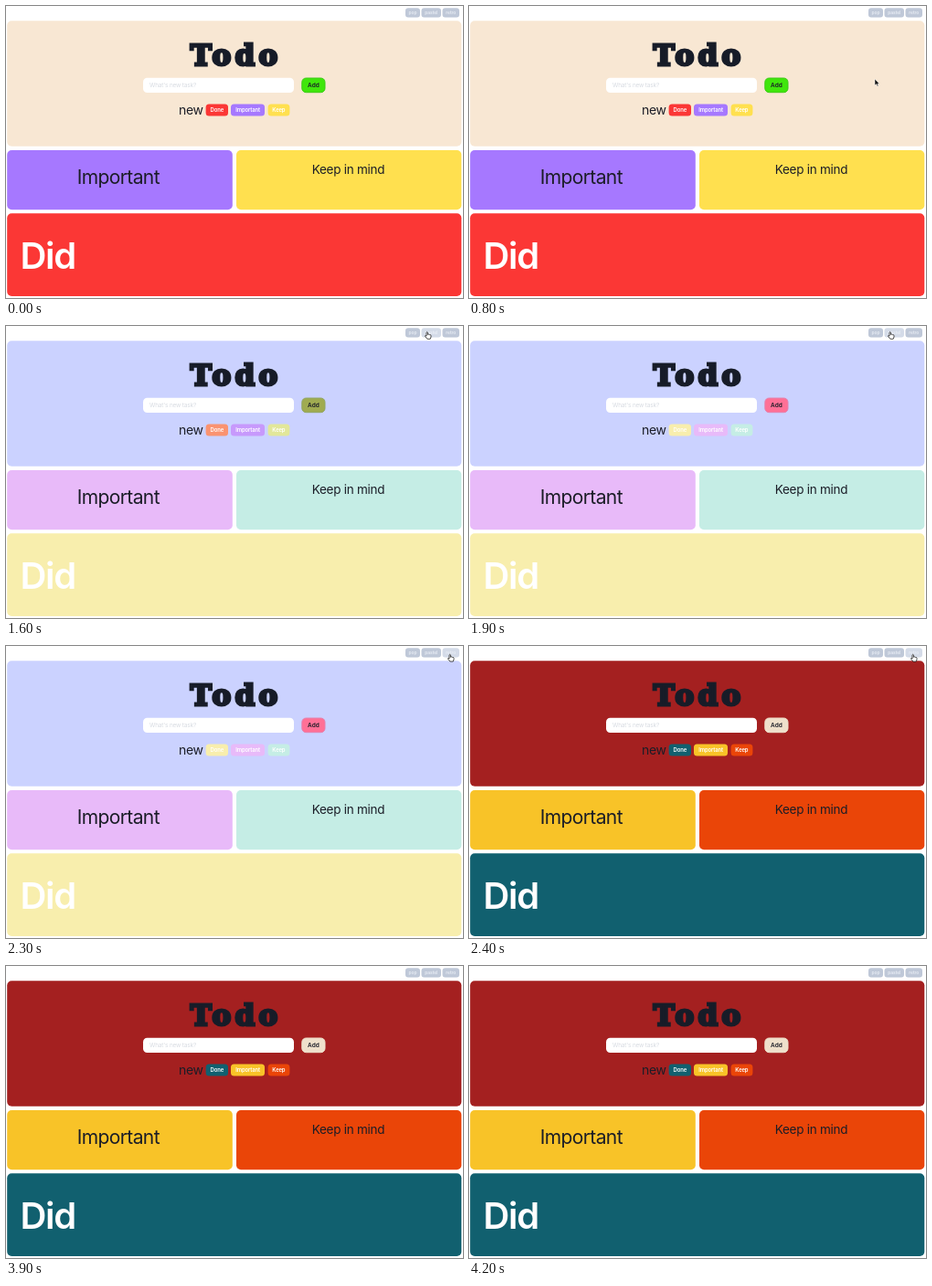
Animation of 500x320 px, one loop 4.3 s. Source, as an HTML page:

```html
<!DOCTYPE html>
<html lang="en">
<head>
<meta charset="utf-8">
<title>Todo</title>
<style>
  html, body { margin: 0; width: 100%; height: 100%; overflow: hidden; background: #fff; }
  svg { display: block; width: 500px; height: 320px; }
  text { font-family: Inter, Roboto, sans-serif; fill: #1b1d27; letter-spacing: -.02em; }
  .title { font: 700 31px "DejaVu Serif", serif; letter-spacing: 4.3px; text-anchor: middle;
    fill: #171c28; stroke: #171c28; stroke-width: 3px; }
  .important-head { font-size: 21px; letter-spacing: -.03em; }
  .keep-head { font-size: 13.5px; }
  .did-head { font-size: 40px; font-weight: 600; letter-spacing: -.03em; fill: #fff; }
  .new { font-size: 14px; }
  .hint { font-size: 6.4px; fill: #d6dae1; }
  .chip { font-size: 5.9px; font-weight: 600; fill: #fff; text-anchor: middle; }
  .add { font-size: 6.5px; font-weight: 600; text-anchor: middle; letter-spacing: 0; }
  .tab { font-size: 5px; font-weight: 500; fill: #edf1f8; text-anchor: middle; }
</style>
</head>
<body>
<svg id="stage" viewBox="0 0 500 320"></svg>
<script>
const LOOP = 4300;
const stage = document.getElementById('stage');

function add(tag, attrs, text) {
  const node = document.createElementNS('http://www.w3.org/2000/svg', tag);
  for (const key in attrs) node.setAttribute(key, attrs[key]);
  if (text) node.textContent = text;
  return stage.appendChild(node);
}
const box = (x, y, right, bottom, rx, fill = 'none') =>
  add('rect', { x, y, width: right - x, height: bottom - y, rx, fill });
const label = (style, x, y, text) => add('text', { class: style, x, y }, text);

const themes = {
  pop: { main: '#f8e7d3', important: '#a678ff', keep: '#ffe04f', did: '#fb3735', add: '#40e60c', edge: '#3bcb16' },
  pastel: { main: '#cbd2ff', important: '#e8baf9', keep: '#c5ede5', did: '#f8eead', add: '#ff7096', edge: '#e480ae' },
  retro: { main: '#a42020', important: '#f8c328', keep: '#ea4508', did: '#11606f', add: '#efe0cb', edge: '#efe0cb' }
};

const panels = {
  main: box(1.2, 16.2, 498.3, 153.7, 5),
  important: box(1.2, 158, 247.8, 223.2, 5),
  keep: box(252, 158, 498.3, 223.2, 5),
  did: box(1.2, 227.3, 498.3, 318, 5)
};
label('title', 251.6, 64.6, 'Todo');
label('important-head', 77.8, 195, 'Important');
label('keep-head', 334.7, 184, 'Keep in mind');
label('did-head', 15.4, 288.2, 'Did');

box(150, 78.7, 315, 95, 4.5, '#fff');
label('hint', 157, 89, "What's new task?");
label('new', 188.9, 119.3, 'new');

const chips = {
  did: box(218.6, 107.6, 243, 120.6, 3.5),
  important: box(246, 107.6, 283, 120.6, 3.5),
  keep: box(286.6, 107.6, 310.4, 120.6, 3.5),
  add: box(323.8, 79, 349, 94.7, 4.5)
};
label('chip', 230.8, 116.2, 'Done');
label('chip', 264.6, 116.2, 'Important');
label('chip', 298.4, 116.2, 'Keep');
label('add', 336.4, 89.2, 'Add');

const tabs = [['pop', 437, 453], ['pastel', 454.5, 476], ['retro', 477.5, 496]].map(([name, left, right]) => {
  const node = box(left, 2.3, right, 12.5, 3);
  label('tab', (left + right) / 2, 8.8, name);
  return { node, left, right };
});

const arrow = add('path', {
  d: 'M0 0V7L1.7 5.6 2.8 8 3.9 7.5 2.9 5.2H5Z',
  fill: '#111', stroke: '#fff', 'stroke-width': .5
});
const hand = add('path', {
  d: 'M0 .8Q.7-.4 1.4.8V3.2Q3 2.5 3.5 3.4 5 3.1 5 4.5V5.8L4.2 8H.9L-1.5 5Q-1.4 4-.6 4.4L0 5Z',
  fill: '#fff', stroke: '#222', 'stroke-width': .8
});

// Pointer steps: start time, x, y
const pointerSteps = [
  [500, 489, 153], [600, 433.5, 105], [800, 444, 80], [900, 458, 52], [1000, 468, 30],
  [1100, 472, 14], [1200, 464, 9], [1300, 460, 6.2],
  [2000, 464, 7], [2100, 472, 8], [2200, 480, 9], [2300, 485, 9],
  [2900, 489, 6], [3000, -50, -50]
];
const themeSteps = [[0, 'pop'], [1600, 'pastel'], [2400, 'retro']];
const current = (steps, time) => steps.filter(step => step[0] <= time).pop();

function draw(time) {
  const theme = themes[current(themeSteps, time)[1]];
  // Small buttons fade briefly behind the first theme switch.
  const fading = time >= 1600 && time < 1700;
  const small = key => fading ? `color-mix(in srgb, ${themes.pop[key]}, ${theme[key]})` : theme[key];
  for (const key in panels) panels[key].style.fill = theme[key];
  for (const key in chips) chips[key].style.fill = small(key);
  chips.add.style.stroke = small('edge');

  const [, x, y] = current(pointerSteps, time) || [0, -50, -50];
  let hovering = false;
  for (const { node, left, right } of tabs) {
    const over = y >= 2 && y <= 12.5 && x >= left && x <= right;
    hovering = hovering || over;
    node.style.fill = over ? '#d4dbe8' : '#bfc8d8';
  }
  arrow.style.display = hovering ? 'none' : '';
  hand.style.display = hovering ? '' : 'none';
  (hovering ? hand : arrow).setAttribute('transform', `translate(${x} ${y})`);
}

function tick() {
  draw(performance.now() % LOOP);
  requestAnimationFrame(tick);
}
tick();
</script>
</body>
</html>
```
